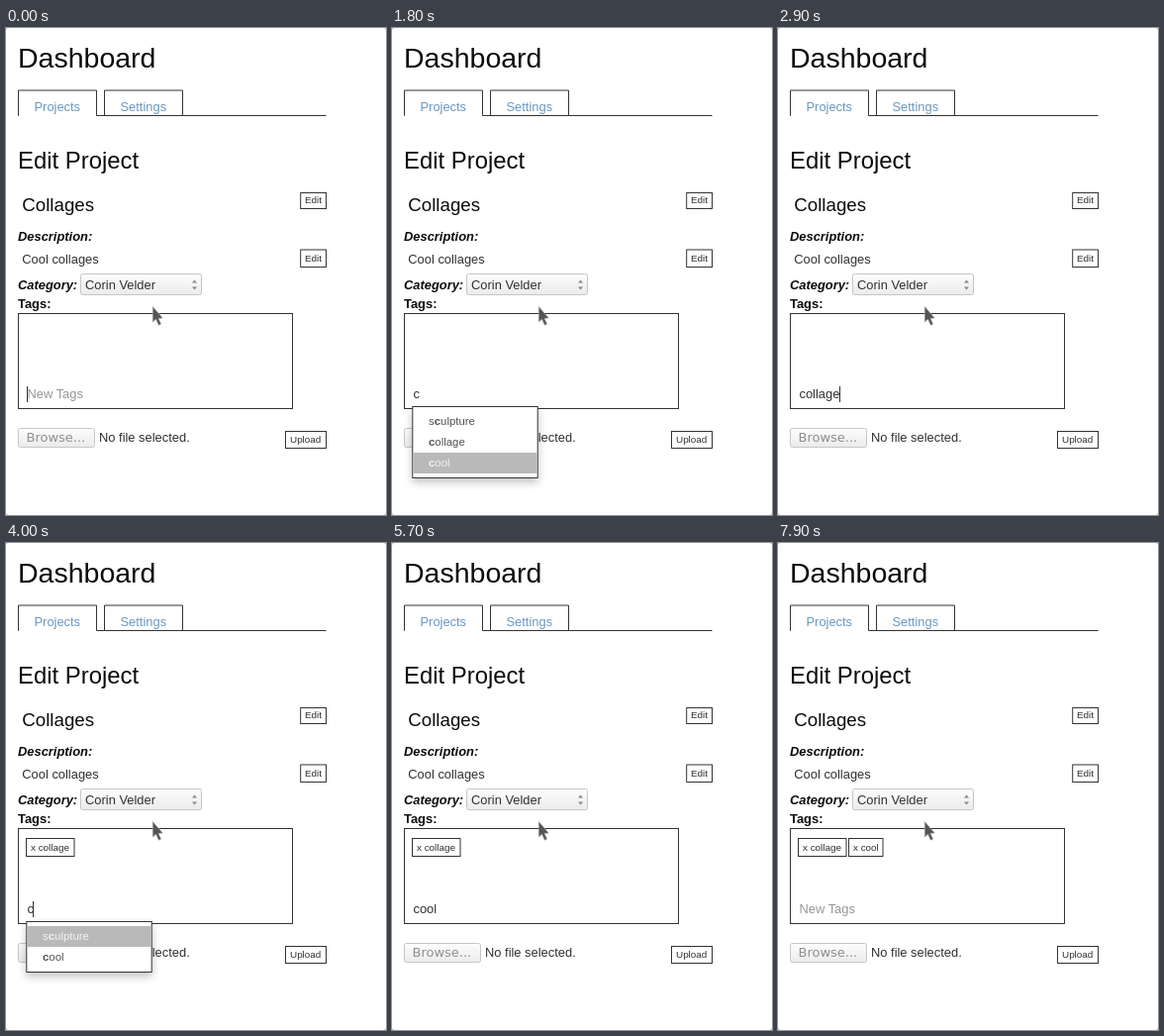
These frames come from a looping animation (384 by 492 pixels, 8000 ms). An HTML page:

```html
<!DOCTYPE html>
<html lang="en">
<head>
<meta charset="utf-8">
<title>Dashboard</title>
<style>
html, body { margin: 0; width: 100%; height: 100%; overflow: hidden; background: #fff; }
svg { display: block; width: 384px; height: 492px; font: 12.9px "Liberation Sans", Arial, sans-serif; fill: #303030; }
text { white-space: pre; }
.box { fill: #fff; stroke: #333; }
.small { font-size: 9.9px; }
.link { fill: #6a98c0; }
.dark { fill: #0c0c0c; }
.bi { font-weight: bold; font-style: italic; }
.button { fill: url(#shade); stroke: #c6c6c6; }
.menu { filter: drop-shadow(0 4px 4px rgba(0, 0, 0, .24)); }
.item { font-size: 11.4px; fill: #525252; }
.item.on { fill: #f2f2f2; }
.match { font-weight: bold; }
</style>
</head>
<body>
<svg viewBox="0 0 384 492">
  <defs>
    <linearGradient id="shade" x2="0" y2="1">
      <stop stop-color="#fdfdfd"/><stop offset="1" stop-color="#ebebeb"/>
    </linearGradient>
  </defs>
  <path fill="#bbb" d="M0 0h3q-3 0-3 3zM384 0v3q0-3-3-3zM0 492v-3q0 3 3 3zM384 492h-3q3 0 3-3z"/>

  <text class="dark" x="12" y="39.5" font-size="28.5">Dashboard</text>
  <path class="box" d="M12 88.5h.5V63h79v25.5H323.5M99.5 88.5V63h79v25.5"/>
  <text class="link" x="28.5" y="84">Projects</text>
  <text class="link" x="115.5" y="84">Settings</text>

  <text class="dark" x="12" y="142" font-size="23.9">Edit Project</text>
  <text class="dark" x="16.3" y="185" font-size="18.7">Collages</text>
  <text class="dark bi" x="12" y="215">Description:</text>
  <text x="16.3" y="238">Cool collages</text>
  <text class="dark bi" x="12" y="263.5">Category:</text>
  <rect class="button" x="75.5" y="248.5" width="122" height="21" rx="2"/>
  <text x="80" y="263.5">Corin Velder</text>
  <path fill="#888" d="M188 257.5l2.5-3 2.5 3zM188 261.5l2.5 3 2.5-3z"/>
  <text class="dark" x="12" y="282.7" font-weight="bold">Tags:</text>
  <rect class="box" x="12.5" y="288.5" width="277" height="96"/>

  <rect class="box" x="297.7" y="166.5" width="25.8" height="16"/>
  <text class="small" x="302" y="177.3">Edit</text>
  <rect class="box" x="297.7" y="224" width="25.8" height="17.5"/>
  <text class="small" x="302" y="235.7">Edit</text>
  <rect class="box" x="282.5" y="407.5" width="41" height="17"/>
  <text class="small" x="287" y="419.3">Upload</text>
  <rect class="button" x="12.5" y="404.5" width="77" height="19" rx="2"/>
  <text x="20.5" y="418" font-size="13" font-family="DejaVu Sans, sans-serif" fill="#8f8f8f">Browse...</text>
  <text x="94" y="418">No file selected.</text>

  <g id="live"></g>
  <path fill="#555" stroke="#aaa" stroke-width=".6" d="M148.3 281.5v15.5l3.2-2.8 2.8 6 2.4-1.1-2.7-5.7 4.3-.4z"/>
</svg>
<script>
const LOOP = 8000;
const live = document.getElementById("live");
const pen = document.createElement("canvas").getContext("2d");
pen.font = '12.9px "Liberation Sans", Arial, sans-serif';

const ALL = ["sculpture", "collage", "cool"], REST = ["sculpture", "cool"];
// start time, typed text, caret shown, tag count, menu items, selected item
const steps = [
  [0, "", 1, 0],
  [100, "c", 1, 0, ALL, 0],
  [1400, "c", 0, 0, ALL, 0],
  [1600, "c", 0, 0, ALL, 1],
  [1700, "c", 0, 0, ALL, 2],
  [2400, "c", 0, 0, ALL, 1],
  [2900, "collage", 1, 0],
  [3400, "", 1, 1],
  [4000, "c", 1, 1, REST, 0],
  [4400, "coo", 1, 1, ["cool"], 0],
  [4500, "cool", 1, 1, ["cool"], 0],
  [5500, "cool", 0, 1],
  [6500, "", 1, 2],
  [7900, "", 0, 2]
];
const tags = [["collage", 20.5, 48.5], ["cool", 71.5, 34.5]];

const tag = ([name, x, w]) =>
  `<rect class="box" x="${x}" y="298.5" width="${w}" height="18"/>
   <text class="small" x="${x + 4.5}" y="310.5">x ${name}</text>`;

function menu(items, typed, selected) {
  const rows = items.map((name, i) => {
    const y = 387 + 21 * i, at = name.indexOf(typed), end = at + typed.length;
    const on = i === selected;
    return (on ? `<rect x="21" y="${y}" width="126" height="21" fill="#b9b9b9"/>` : "") +
      `<text class="item ${on ? "on" : ""}" x="37" y="${y + 14}">${name.slice(0, at)}<tspan class="match">${typed}</tspan>${name.slice(end)}</text>`;
  });
  return `<rect class="box menu" x="20.8" y="382.5" width="126.4" height="${9 + 21 * items.length}"/>` + rows.join("");
}

function draw([, typed, caret, count, items, selected]) {
  const x = 21.5 + pen.measureText(typed).width;
  live.innerHTML = tags.slice(0, count).map(tag).join("") +
    `<text x="21.5" y="374.4" ${typed ? "" : 'fill="#969696"'}>${typed || "New Tags"}</text>` +
    (caret ? `<rect x="${Math.floor(x)}" y="362" width="1" height="16"/>` : "") +
    (items ? menu(items, typed, selected) : "");
}

let shown;
function tick() {
  const t = performance.now() % LOOP;
  const step = steps.findLast(s => s[0] <= t);
  if (step !== shown) draw(shown = step);
  requestAnimationFrame(tick);
}
tick();
</script>
</body>
</html>
```
